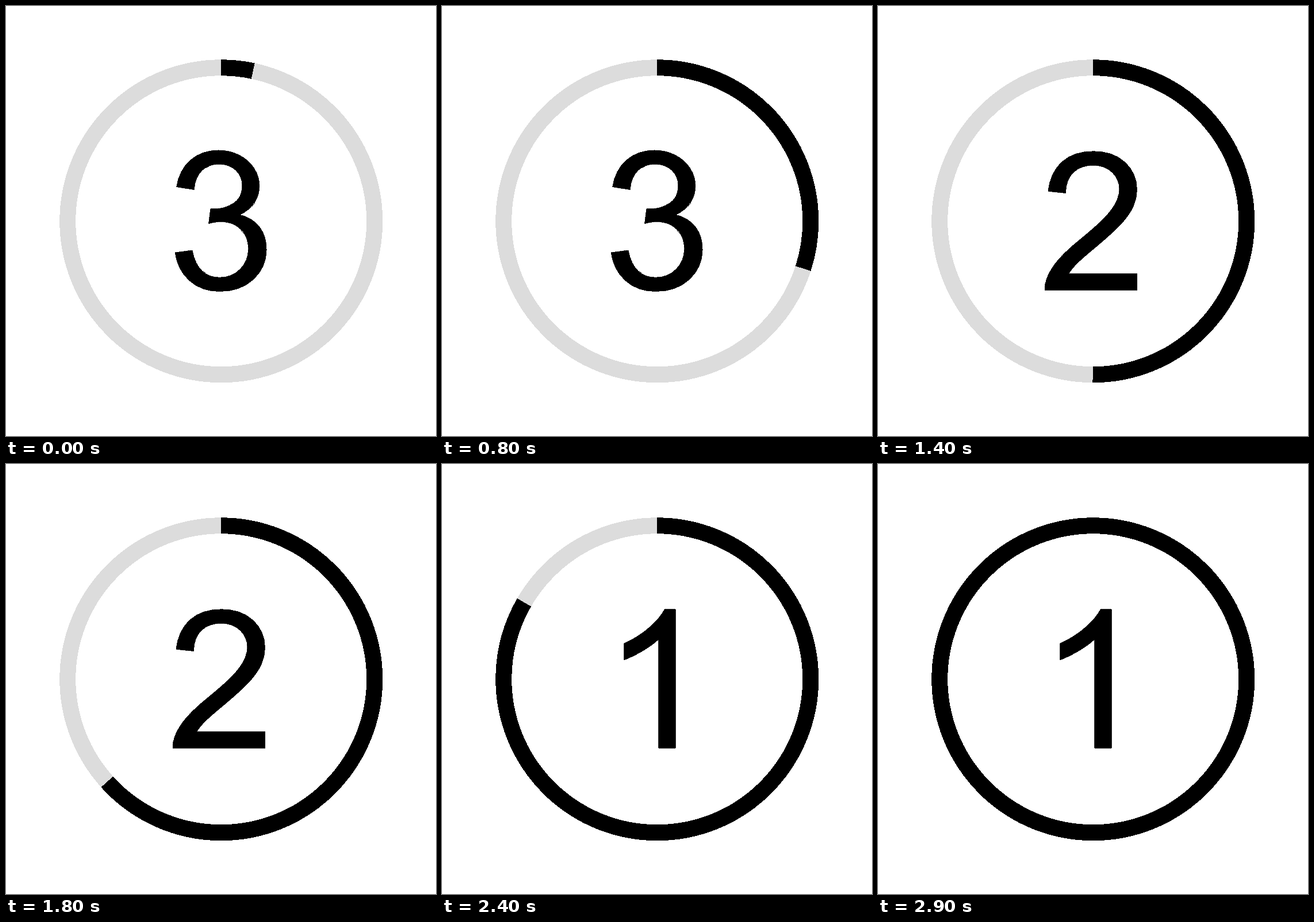
An HTML page that plays this animation: 748x748 px, repeating every 3 s.

```html
<!DOCTYPE html>
<html lang="en">
<head>
<meta charset="utf-8">
<title>Countdown</title>
<style>
  html, body { margin: 0; height: 100%; overflow: hidden; background: #fff; }
  svg { display: block; width: 100%; height: 100%; }
  circle { fill: none; stroke: #dcdcdc; stroke-width: 28; }
  #progress { stroke: #000; }
  #digit { stroke: #000; stroke-width: .8; vector-effect: non-scaling-stroke; }
</style>
</head>
<body>
<svg viewBox="0 0 748 748" shape-rendering="crispEdges" role="img">
  <circle cx="374.25" cy="374.25" r="267"/>
  <circle id="progress" cx="374.25" cy="374.25" r="267" pathLength="30" transform="rotate(-90 374.25 374.25)"/>
  <path id="digit"/>
</svg>
<script>
const STEP_MS = 100, STEPS = 30, STEPS_PER_DIGIT = 10;

// Grotesque numerals in 2048-unit em space, y up; each is centred vertically.
const digits = {
  1: { baseline: 494.2, outline: 'M763 0H583V1152Q518 1090 412.5 1028T223 935V1110Q374 1180 487 1280T647 1472H763Z' },
  2: { baseline: 494.2, outline: 'M1031 173V0H62Q60 65 83 125Q120 224 201.5 320T437 542Q676 738 760 852.5T844 1069Q844 1176 767.5 1249.5T568 1323Q438 1323 360 1245T281 1029L96 1048Q121 1254 244 1363T572 1472Q782 1472 905 1356T1029 1065Q1029 977 993 892T873.5 713T596 455Q434 319 388 270.5T312 173Z' },
  3: { baseline: 492.4, outline: 'M86 387L266 411Q297 258 371.5 190.5T553 123Q680 123 767.5 211T855 429Q855 553 774 633.5T568 714Q516 714 438 694L458 852Q478 850 490 850Q606 850 698 910T790 1096Q790 1196 722 1260T547 1325Q441 1325 370 1259T284 1054L100 1084Q131 1267 247.5 1369T540 1472Q661 1472 761.5 1420T917 1279T970 1090Q970 993 918 914T765 788Q898 757 971.5 660T1045 417Q1045 230 908 102T553 -25Q362 -25 236 88.5T86 387Z' }
};

const svg = document.querySelector('svg');
const progress = document.getElementById('progress');
const digit = document.getElementById('digit');

function draw(now) {
  const step = Math.floor(now / STEP_MS) % STEPS;
  const value = 3 - Math.floor(step / STEPS_PER_DIGIT);
  const { baseline, outline } = digits[value];
  progress.setAttribute('stroke-dasharray', `${step + 1} ${STEPS}`);
  digit.setAttribute('d', outline);
  digit.setAttribute('transform', `translate(279.95 ${baseline}) scale(.1657 -.164)`);
  svg.setAttribute('aria-label', value);
}

const start = performance.now();
function tick() {
  draw(performance.now() - start);
  requestAnimationFrame(tick);
}
tick();
</script>
</body>
</html>
```
